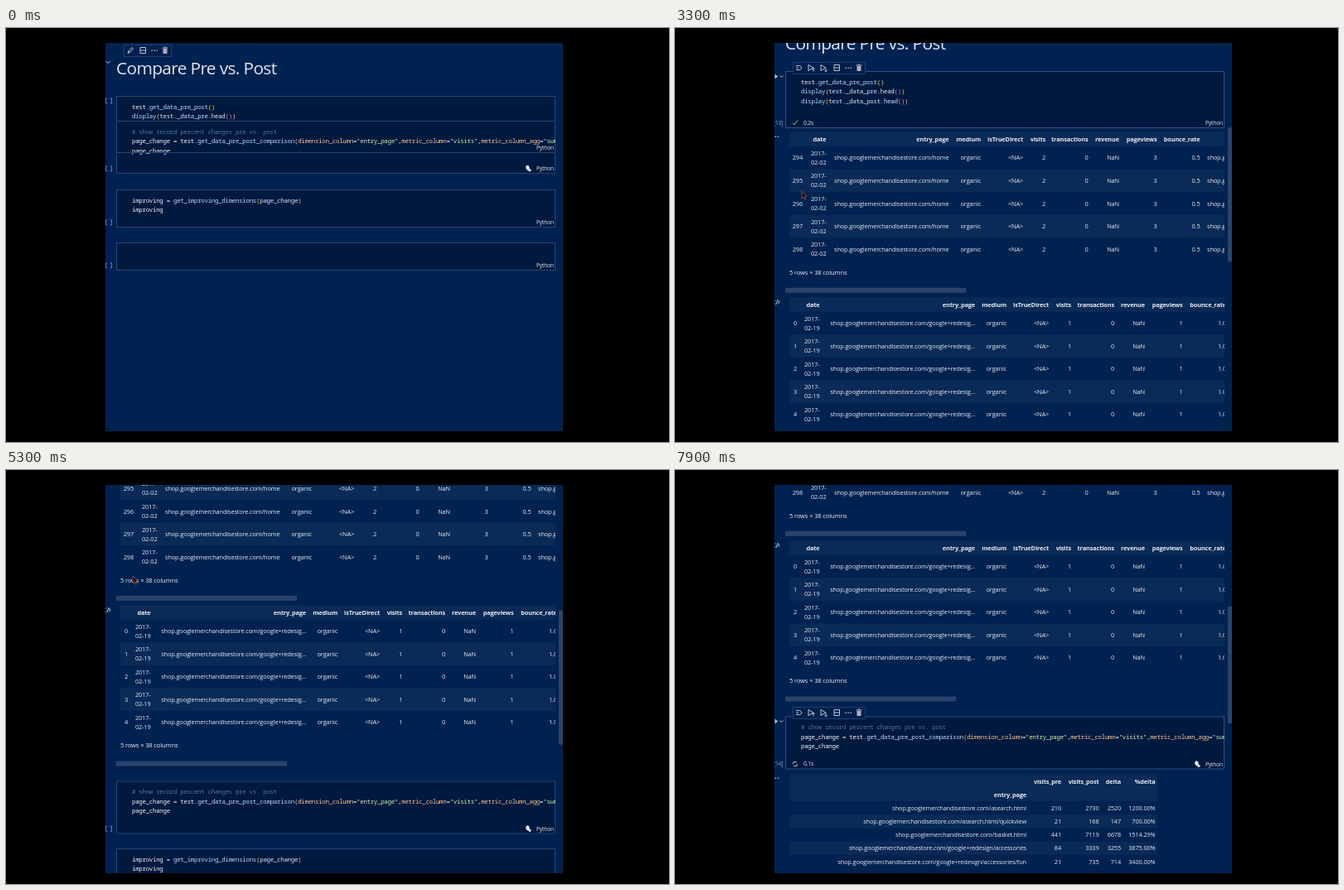
Recreate the animation shown at these times as an HTML page with a canvas. Size 800 by 500 pixels, loop 8000 ms.

```html
<!DOCTYPE html>
<html lang="en">
<head>
<meta charset="utf-8">
<title>Notebook</title>
<style>
html, body { margin: 0; width: 100%; height: 100%; overflow: hidden; background: #000; }
canvas { display: block; width: 800px; height: 500px; }
</style>
</head>
<body>
<canvas id="stage" width="800" height="500"></canvas>
<script>
const ctx = document.getElementById('stage').getContext('2d');
const LOOP = 8000, STEP = 100;
const RUN1 = 1800, OUT1 = 2000, DONE1 = 2300, RUN2 = 7400, OUT2 = 7700;
const BG = '#002250', CELL = '#00193f', BORDER = '#234677', BAND = '#0a2a57', BAR = '#2b436b';
const WHITE = '#f2f5f9', BLUE = '#bbdaff', ORANGE = '#ffc58f', GREEN = '#d1f1a9';
const GOLD = '#f0d040', PURPLE = '#d783d8', GREY = '#5b6f9d', ICON = '#b9c5d6';
const SANS = '"Open Sans", "Noto Sans", sans-serif';
const MONO = '"Noto Sans Mono", "DejaVu Sans Mono", monospace';
const CHAR = 4.17, LINE = 11.4, RIGHT = 663;

// time, page offset
const scrollKeys = [[3000, 0], [3300, 30], [3500, 60], [4400, 120], [5000, 120], [5500, 240], [5700, 270]];
// time, x, y
const mouseKeys = [[400, 110, 150], [1000, 119, 93], [2600, 119, 93], [3100, 153, 197],
  [3600, 153, 197], [4200, 153, 128], [5900, 153, 128], [6500, 140, 310], [6800, 117, 301],
  [7400, 117, 301], [7700, 108, 301]];

function at(keys, t, i = 1) {
  if (t <= keys[0][0]) return keys[0][i];
  for (let k = 1; k < keys.length; k++) {
    const a = keys[k - 1], b = keys[k];
    if (t <= b[0]) return a[i] + (b[i] - a[i]) * (t - a[0]) / (b[0] - a[0]);
  }
  return keys[keys.length - 1][i];
}

function rect(x, y, w, h, color) {
  ctx.fillStyle = color;
  ctx.fillRect(x, y, w, h);
}

function frame(x, y, w, h, color) {
  ctx.strokeStyle = color;
  ctx.lineWidth = 1;
  ctx.strokeRect(x + .5, y + .5, w - 1, h - 1);
}

// polylines given as flat coordinate lists
function lines(x, y, color, ...paths) {
  ctx.strokeStyle = color;
  ctx.lineWidth = 1;
  ctx.beginPath();
  for (const p of paths)
    for (let i = 0; i < p.length; i += 2) ctx[i ? 'lineTo' : 'moveTo'](x + p[i], y + p[i + 1]);
  ctx.stroke();
}

// y is the middle of the capitals
function text(s, x, y, { align = 'left', size = 7.4, weight = 400, color = '#e6ebf2', gap = -.15 } = {}) {
  ctx.font = `${weight} ${size}px ${SANS}`;
  ctx.letterSpacing = gap + 'px';
  ctx.textAlign = align;
  ctx.fillStyle = color;
  ctx.fillText(s, x, y + size * .36);
}

function code(x, y, parts) {
  ctx.font = `500 7.4px ${MONO}`;
  ctx.letterSpacing = '-0.27px';
  ctx.textAlign = 'left';
  let n = 0;
  for (const [s, color] of parts) {
    ctx.fillStyle = color;
    ctx.fillText(s, x + n * CHAR, y + 2.5);
    n += s.length;
  }
}

const display = name => [['display', BLUE], ['(', GOLD], ['test._data_' + name + '.head', '#dbe8fb'], ['()', PURPLE], [')', GOLD]];
const code1 = [
  [['test', WHITE], ['.get_data_pre_post', BLUE], ['()', GOLD]],
  display('pre'), display('post')];
const code2 = [
  [['# show record percent changes pre vs. post', GREY]],
  [['page_change = test', WHITE], ['.get_data_pre_post_comparison', BLUE], ['(', GOLD],
    ['dimension_column', ORANGE], ['=', WHITE], ['"entry_page"', GREEN], [',', WHITE],
    ['metric_column', ORANGE], ['=', WHITE], ['"visits"', GREEN], [',', WHITE],
    ['metric_column_agg', ORANGE], ['=', WHITE], ['"sum"', GREEN]],
  [['page_change', WHITE]]];
const code3 = [
  [['improving = ', WHITE], ['get_improving_dimensions', BLUE], ['(', GOLD], ['page_change', '#dbe8fb'], [')', GOLD]],
  [['improving', WHITE]]];

function language(y) {
  text('Python', 661, y, { align: 'right', size: 6.7 });
}

function label(s, y) {
  text(s, 130, y, { align: 'right', size: 6.5, color: '#8fa3c0' });
}

function emptyLabel(y) {
  lines(120, y, '#5f7fa8', [2, -3, .5, -3, .5, 3, 2, 3], [5.5, -3, 7.5, -3, 7.5, 3, 5.5, 3]);
}

function badge(y) {
  ctx.fillStyle = '#dfe5ec';
  ctx.beginPath();
  ctx.ellipse(629.5, y - 1, 2.2, 3, -.3, 0, 7);
  ctx.ellipse(632, y + 2, 1.7, 1.6, 0, 0, 7);
  ctx.fill();
}

function cell(top, bottom, src, { active = false, tag = true } = {}) {
  rect(133, top, 530, bottom - top, CELL);
  frame(133, top, 530, bottom - top, active ? '#2d5288' : BORDER);
  ctx.save();
  ctx.beginPath();
  ctx.rect(133, top, RIGHT - 133, bottom - top);
  ctx.clip();
  src.forEach((l, i) => code(152, top + 13.2 + i * LINE, l));
  ctx.restore();
  language(bottom - 6.2);
  if (tag) emptyLabel(bottom - 6.2);
}

function split(x, y) {
  lines(x, y, ICON, [-3, -3.5, 3.5, -3.5, 3.5, 3.5, -3, 3.5, -3, -3.5], [-3, 0, 3.5, 0]);
}

function dots(x, y) {
  for (let i = -1; i < 2; i++) rect(x + i * 3 - .6, y - .5, 1.4, 1.4, ICON);
}

function bin(x, y) {
  rect(x - 2.5, y - 2, 5, 6, '#b4a9bd');
  rect(x - 3.5, y - 3.5, 7, 1, ICON);
  rect(x - 1, y - 4.5, 2, 1, ICON);
}

function runIcon(x, y, dir) {
  lines(x, y, ICON, [-3, -3.5, 3, 0, -3, 3.5, -3, -3.5]);
  lines(x + 3, y + 2.5, ICON, [0, -2, 0, 2], [-1.5, dir, 0, dir * 2, 1.5, dir]);
}

function panel(y, w) {
  rect(142, y - 7, w, 15, '#001f4a');
  frame(142, y - 7, w, 15, '#1c3f72');
}

function cellTools(y) {
  panel(y, 88);
  lines(149, y, ICON, [-3, -2.5, 1, -2.5], [-3, 0, 0, 0], [-3, 2.5, 1, 2.5], [1.5, -3, 4, 0, 1.5, 3]);
  runIcon(164, y, -1);
  runIcon(179, y, 1);
  split(195, y);
  dots(209, y);
  bin(222, y);
}

function titleTools(y) {
  panel(y, 58);
  lines(150, y, ICON, [-3, 3.5, -2, .5, 2, -3.5, 3.5, -2, -.5, 2.5, -3, 3.5], [-2, 1, 0, 3]);
  split(165, y);
  dots(179, y);
  bin(192, y);
}

function runMark(y, lit) {
  if (lit) rect(120, y - 6, 13, 13, '#3a4b66');
  ctx.fillStyle = lit ? '#e8edf3' : ICON;
  ctx.beginPath();
  ctx.moveTo(120.5, y - 3);
  ctx.lineTo(124, y);
  ctx.lineTo(120.5, y + 3);
  ctx.fill();
  lines(128.5, y, ICON, [-2, -1, 0, 1, 2, -1]);
}

function spinner(y, t) {
  ctx.strokeStyle = ICON;
  ctx.lineWidth = 1;
  for (const a of [0, Math.PI]) {
    ctx.beginPath();
    ctx.arc(145, y, 2.8, a + t / 160, a + t / 160 + 2.4);
    ctx.stroke();
  }
}

function check(y) {
  lines(145, y, '#8fc78a', [-3, .5, -1, 2.5, 3, -3]);
}

function status(y, n, time) {
  label('[' + n + ']', y);
  text(time, 155, y, { size: 6.7 });
}

const heads = ['date', 'entry_page', 'medium', 'isTrueDirect', 'visits', 'transactions', 'revenue', 'pageviews', 'bounce_rate'];

// y is the middle of the header row
function records(y, first, day, edges, values, barW) {
  ctx.save();
  ctx.beginPath();
  ctx.rect(133, y - 12, RIGHT - 133, 220);
  ctx.clip();
  rect(138, y - 8.5, 525, 17, BAND);
  heads.forEach((h, i) => text(h, edges[i + 1], y, { align: 'right', weight: 700 }));
  for (let r = 0; r < 5; r++) {
    const mid = y + 22.4 + r * 27.6;
    if (r % 2) rect(138, mid - 13.8, 525, 27.6, BAND);
    text(first + r, edges[0], mid, { align: 'right' });
    text('2017-', edges[1], mid - 5.5, { align: 'right' });
    text('02-' + day, edges[1], mid + 5.5, { align: 'right' });
    values.forEach((v, i) => text(v, edges[i + 2], mid, { align: 'right' }));
    if (first) text('shop.googlemerch', 642, mid);
  }
  ctx.restore();
  text('5 rows × 38 columns', 138, y + 160.5, { size: 7.6 });
  rect(133, y + 179.5, barW, 6, BAR);
}

const SHOP = 'shop.googlemerchandisestore.com/';
const edges1 = [154, 182.5, 330.5, 369, 420, 447, 498.5, 536, 581.5, 633.5];
const edges2 = [147, 174.5, 362, 400, 451, 478, 530, 567, 612.5, 665];
const values1 = [SHOP + 'home', 'organic', '<NA>', 2, 0, 'NaN', 3, '0.5'];
const values2 = [SHOP + 'google+redesig...', 'organic', '<NA>', 1, 0, 'NaN', 1, '1.0'];
const pages = [
  ['asearch.html', 210, 2730], ['asearch.html/quickview', 21, 168], ['basket.html', 441, 7119],
  ['google+redesign/accessories', 84, 3339], ['google+redesign/accessories/fun', 21, 735]];

function changes(y) {
  const cols = [424, 466, 511.5, 538, 579.5];
  const row = (list, mid, weight) => list.forEach((s, i) => text(s, cols[i], mid, { align: 'right', weight }));
  rect(138, y - 8.5, 444, 32.5, BAND);
  row(['', 'visits_pre', 'visits_post', 'delta', '%delta'], y, 700);
  row(['entry_page'], y + 16, 700);
  pages.forEach(([path, pre, post], i) => {
    const mid = y + 32.2 + i * 16.2, d = post - pre;
    if (i % 2) rect(138, mid - 8.1, 444, 16.2, BAND);
    row([SHOP + path, pre, post, d, (d / pre * 100).toFixed(2) + '%'], mid, 400);
  });
}

function pointer(x, y) {
  ctx.beginPath();
  [[0, 0], [0, 9], [2, 7.2], [3.4, 10.5], [4.8, 9.8], [3.4, 6.8], [6, 6.5]].forEach(p => ctx.lineTo(x + p[0], y + p[1]));
  ctx.closePath();
  ctx.fillStyle = '#0d1020';
  ctx.fill();
  ctx.strokeStyle = '#a2503f';
  ctx.lineWidth = .8;
  ctx.stroke();
}

function draw(t) {
  const ran = t >= RUN1, out1 = t >= OUT1, out2 = t >= OUT2;
  const s = at(scrollKeys, t);
  ctx.textBaseline = 'alphabetic';
  rect(0, 0, 800, 500, '#000');
  ctx.save();
  ctx.beginPath();
  ctx.rect(120, 18, 552, 469);
  ctx.clip();
  rect(120, 18, 552, 469, BG);

  ctx.save();
  ctx.translate(0, -s);
  text('Compare Pre vs. Post', 133, 48.5, { size: 20.8, gap: -.62, color: '#dfe6ef' });
  if (!ran) {
    titleTools(27);
    lines(123, 41.5, ICON, [-2.5, -1.5, 0, 1, 2.5, -1.5]);
  }

  cell(82, 151, code1, { active: ran, tag: false });
  const top2 = out1 ? 567.5 : 112, top3 = out2 ? 800 : out1 ? 649 : 195;
  if (out1) {
    dots(121, 161);
    records(164.3, 294, '02', edges1, values1, 218);
    lines(123, 361, ICON, [-2.5, -2.5, -4, 0, -2.5, 2.5], [1, -3, -1, 3], [1.5, -2, 3, 0, 1.5, 2]);
    records(364, 0, '19', edges2, values2, 206);
  }
  const near2 = t >= 6400;
  cell(top2, top2 + 64, code2, { active: t >= RUN2, tag: t < RUN2 });
  badge(top2 + 57.8);
  if (!out1) {
    rect(133, 150, 530, 1, BORDER);
    language(144.3);
  }
  cell(top3, top3 + 46, code3);
  cell(top3 + 64, top3 + 98, []);

  if (ran) {
    cellTools(78);
    status(144.3, 13, '0.2s');
    t < DONE1 ? spinner(144.3, t - 2100) : check(144.3);
  }
  if (t >= 900) runMark(88.5, t < 2700);
  else emptyLabel(88);
  if (near2) {
    cellTools(563);
    runMark(573.5, t >= 6900 && t < 7500);
  }
  if (t >= RUN2) {
    status(625, 14, '0.1s');
    spinner(625, t - 7900);
  }
  if (out2) {
    dots(121, 642);
    changes(646);
  }
  ctx.restore();

  if (t >= 400) {
    const [y, h] = out2 ? [165, 141] : out1 ? [111 + s * .305, 162] : [161, 217];
    rect(667, y, 5, h, BAR);
  }
  pointer(at(mouseKeys, t, 1), at(mouseKeys, t, 2));
  ctx.restore();
}

function tick() {
  const t = performance.now() % LOOP;
  draw(Math.floor(t / STEP) * STEP);
  requestAnimationFrame(tick);
}
tick();
</script>
</body>
</html>
```
